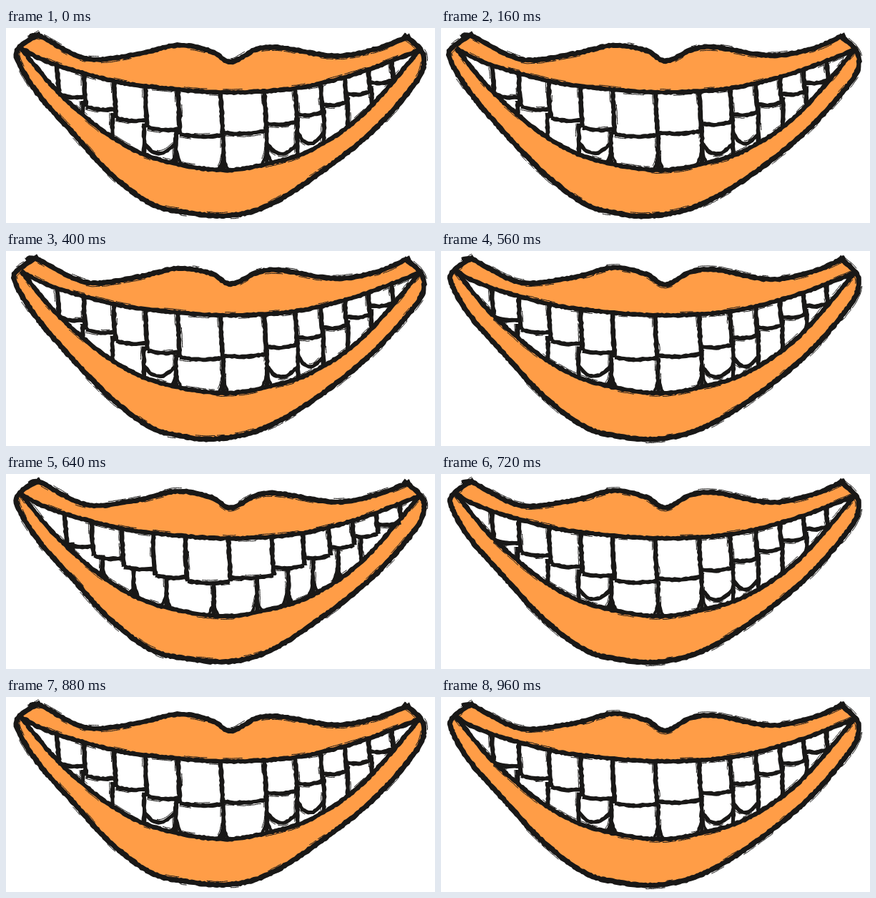
These frames come from a looping animation (600x273 px, 1040 ms). An HTML page:

```html
<!DOCTYPE html>
<html lang="en">
<head>
<meta charset="utf-8">
<title>Grinding grin</title>
<style>
  html, body { margin: 0; width: 100%; height: 100%; overflow: hidden; background: #fff; }
  svg { display: block; width: 100%; height: 100%; }
</style>
</head>
<body>
<svg id="stage" viewBox="0 0 600 273"></svg>
<script>
const INK = '#191817', LIP = '#ff9d47', STEP = 80;

// Key points of the lips, left to right
const TOP = [[33,13],[46,11],[95,38],[130,45],[190,35],[240,24],[287,32],[314,47],[350,30],[385,27],[460,39],[520,29],[566,10]];
const BASE = [[48,8],[20,27],[17,46],[44,91],[92,147],[144,203],[202,245],[250,258],[310,263],[365,249],[430,210],[510,146],[572,78],[584,46],[577,27],[556,10]];
const UPPER = [[21,28],[48,43],[90,58],[150,74],[200,82],[300,90],[400,85],[480,67],[550,42],[579,30]];
const LOWER = [[21,28],[60,76],[100,115],[150,154],[210,183],[300,199],[370,189],[430,169],[500,120],[579,30]];

// Three redrawings of the same mouth: left corner and chin drift a little
const LOOKS = {
  A: { corner: 0, chin: 0, seed: 311 },
  B: { corner: -5, chin: -20, seed: 727 },
  C: { corner: -3, chin: -8, seed: 1319 }
};

// How far each row of teeth slides; fork: reach of the forked lower borders
const POSES = {
  rest: { up: 0, low: 0, fork: 70, cups: [3, 6, 7] },
  right: { up: 11, low: -14, fork: 190, cups: [] },
  left: { up: -14, low: 13, fork: 190, cups: [] }
};
const LOOK_ORDER = 'ACBACBACACBAC';
const POSE_AT = { 8: 'right', 10: 'left' };

const BORDERS = [72];
for (const w of [38, 42, 44, 45, 60, 61, 43, 36, 34, 33, 32]) BORDERS.push(BORDERS.at(-1) + w);

let seed = 1;
function rnd() {
  seed = (seed * 16807) % 2147483647;
  return seed / 2147483647 - 0.5;
}

// Catmull-Rom samples, roughly every 3 px
function smooth(pts) {
  const out = [];
  for (let i = 0; i < pts.length - 1; i++) {
    const b = pts[i], c = pts[i + 1], a = pts[i - 1] || b, d = pts[i + 2] || c;
    const n = Math.max(2, Math.round(Math.hypot(c[0] - b[0], c[1] - b[1]) / 3));
    for (let k = 0; k < n; k++) {
      const t = k / n;
      out.push([0, 1].map(j => b[j] + 0.5 * t * (c[j] - a[j] +
        t * (2 * a[j] - 5 * b[j] + 4 * c[j] - d[j] + t * (3 * (b[j] - c[j]) + d[j] - a[j])))));
    }
  }
  out.push(pts.at(-1));
  return out;
}

const line = pts => 'M' + pts.map(p => p[0].toFixed(1) + ' ' + p[1].toFixed(1)).join('L');
const shape = (pts, fill) => `<path d="${line(pts)}Z" fill="${fill}"/>`;
const ring = (a, b, fill) => shape(smooth(a).concat(smooth(b).reverse()), fill);

// A rough marker stroke with stray hairlines close to its edges
function ink(pts, width) {
  const s = smooth(pts), one = [], two = [];
  let hairs = '', hair = [], side = 1, left = 6;
  s.forEach((p, i) => {
    const a = s[Math.max(0, i - 1)], b = s[Math.min(s.length - 1, i + 1)];
    const len = Math.hypot(b[0] - a[0], b[1] - a[1]) || 1;
    const nx = (a[1] - b[1]) / len, ny = (b[0] - a[0]) / len;
    const at = d => [p[0] + nx * d, p[1] + ny * d];
    one.push(at(width / 2 + rnd() * 1.4));
    two.unshift(at(-width / 2 + rnd() * 1.4));
    hair.push(at(side * (width / 2 + 1 + rnd() * 0.6)));
    if (--left < 0) {
      if (rnd() > 0) hairs += line(hair);
      hair = [];
      side = rnd() > 0 ? 1 : -1;
      left = 7 + rnd() * 8;
    }
  });
  return shape(one.concat(two), INK) +
    `<path d="${hairs}" fill="none" stroke="${INK}"/>`;
}

function heightOn(pts, x) {
  let i = 1;
  while (i < pts.length - 1 && pts[i][0] < x) i++;
  const [a, b] = [pts[i - 1], pts[i]];
  return a[1] + (b[1] - a[1]) * (x - a[0]) / (b[0] - a[0]);
}

const roof = smooth(UPPER), floor = smooth(LOWER);
const gum = x => heightOn(floor, x);

// The line where both rows meet
const bite = x => 151 - 0.0121 * Math.abs(x - 287) ** 1.6;

function teeth(pose) {
  const up = BORDERS.map(x => x + pose.up);
  const low = BORDERS.map(x => x + pose.low + 3 * Math.sign(x - 270));
  const edges = up.slice(1).map((b, i) => {
    const mid = bite((up[i] + b) / 2);
    return [up[i], b].map(x => mid + 0.2 * (bite(x) - mid));
  });
  let out = '';

  up.forEach((x, i) => {
    const deep = Math.max(i ? edges[i - 1][1] : 0, edges[i] ? edges[i][0] : 0);
    const top = heightOn(roof, x), end = Math.min(deep, gum(x));
    out += ink([[x - 1, top], [x + rnd() * 2, (top + end) / 2], [x + 2, end]], 6.6);
  });

  edges.forEach(([l, r], i) => {
    const a = up[i] + 2, b = up[i + 1] + 1;
    out += ink([[a, l], [(a + b) / 2, (l + r) / 2 + 2.5], [b, r]], 6);
  });

  low.slice(1, -1).forEach(x => {
    const top = bite(x), end = gum(x);
    out += ink([[x, top], [x + rnd() * 2, (top + end) / 2], [x, end]], 6);
    if (Math.abs(x - 300) > pose.fork) return;
    const rise = (end - top) * 0.45;
    for (const d of [-7, 7])
      out += ink([[x, end - rise], [x + d * 0.35, end - rise / 2], [x + d, gum(x + d)]], 4);
  });

  for (const i of pose.cups) {
    const a = low[i], b = low[i + 1], w = b - a;
    const y = (gum(a) + gum(b)) / 2 - 9;
    out += ink([[a, y - 14], [a + w * 0.25, y - 2], [a + w * 0.6, y], [b, y - 13]], 5.5);
  }
  return out;
}

function draw(look, pose) {
  seed = look.seed;
  const drift = ([x, y]) => [x + look.corner * Math.max(0, 1 - x / 150) + rnd() * 2, y + rnd() * 2];
  const sag = ([x, y]) => [x + look.chin * Math.exp(-(((x - 300) / 70) ** 2)), y];
  const top = TOP.map(drift), base = BASE.map(sag).map(drift);
  return ring(top, base, LIP) + ring(UPPER, LOWER, '#fff') + teeth(pose) +
    ink(UPPER, 6.4) + ink(LOWER, 6.4) + ink(top, 7.2) + ink(base, 7.4);
}

const stage = document.getElementById('stage');
const cells = [...LOOK_ORDER].map((key, i) => draw(LOOKS[key], POSES[POSE_AT[i] || 'rest']));
let shown = -1;

function show(ms) {
  const i = Math.floor(ms / STEP) % cells.length;
  if (i !== shown) stage.innerHTML = cells[shown = i];
}

const start = performance.now();
function tick() {
  show(performance.now() - start);
  requestAnimationFrame(tick);
}
tick();
</script>
</body>
</html>
```
